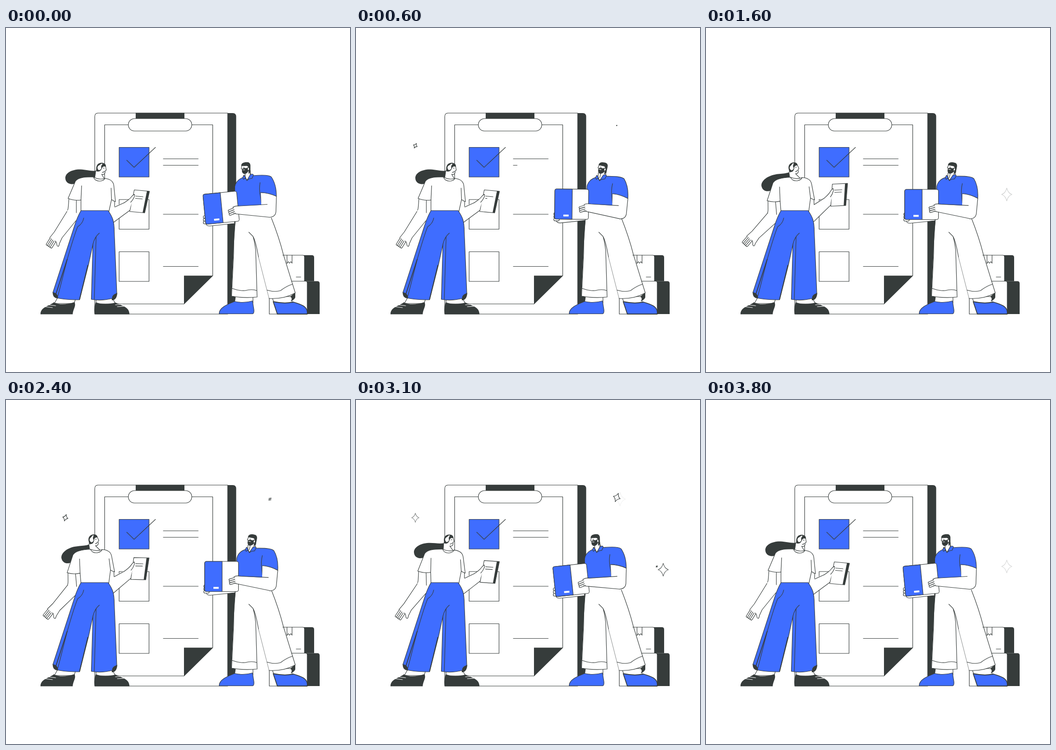
An HTML page for the animation above (3.9 s loop, 748 px wide and 748 px high).

```html
<!DOCTYPE html>
<html lang="en">
<head>
<meta charset="utf-8">
<title>Checklist</title>
<style>
  html, body { margin: 0; width: 100%; height: 100%; overflow: hidden; background: #fff; }
  svg { display: block; width: 100vw; height: 100vh; }
  .art { fill: #fff; stroke: #363c3b; stroke-width: 1.15; stroke-linejoin: round; stroke-linecap: round; }
  .b { fill: #3f6dff; }
  .d { fill: #363c3b; stroke: none; }
  .n { fill: none; }
  .s { stroke: none; }
  .w { stroke: #fff; fill: none; }
  .thin { fill: none; stroke-width: .6; }
  .thick { stroke-width: 1.8; }
  .star { fill: none; vector-effect: non-scaling-stroke; }
</style>
</head>
<body>
<svg viewBox="0 0 748 748">
<g class="art">
  <!-- clipboard -->
  <path d="M482 185H493Q500.500 185 500.500 193V622H482Z" class="d"/>
  <path d="M193 622V193Q193 185 200 185H482V622Z"/>
  <path d="M214.500 600V210.500H449.500V538.500L387 600Z"/>
  <path d="M387 538.500H449.500L387 600.500Z" class="d"/>
  <path d="M282 184.500H388V198H282Z" class="d"/>
  <rect x="266" y="197" width="138" height="27" rx="13.500"/>
  <g id="rows"></g>
  <path d="M262.500 287.500L278.500 303L325 259.500" class="n"/>
  <path id="line" class="n"/>

  <g id="parcels"></g>
  <path d="M611 494V512L614 508L616.500 511.500L619.500 508L622 511.500V494M631 541.500H641" class="n"/>
  <g id="stars"></g>

  <!-- woman, upper body -->
  <g id="wTorso">
    <path id="tail" class="d" d="M205 308C190 314 178 308 162 307.500C144 307 129 315 129 326C129 336 138 341 148 339C162 335 164 323 201 324Z"/>
    <path class="s" d="M137 369L133 404L150 422L160 400L155 370Z"/>
    <path class="n" d="M137 369L135.500 388Q135 396 132 400M153 374V402"/>
    <g id="foreArm">
      <g id="wHand"></g>
      <path class="s" d="M134 396L104 444L96 456L107 465L122 456L152 420L153 402Z"/>
      <path d="M107 463Q110 465 111 473Q115 478 116 469L122 456L152 419" class="n"/>
      <path d="M132.500 399L105 443.500L95 456" class="n"/>
    </g>
    <g id="wHead">
      <path d="M195 312L192.500 330H215L208 318Q214 320 215.500 314V311L218 309L216.500 300L203 295Z"/>
      <path class="d" d="M197 312C194 299 200 293 208 293C215 293.500 218 297 217 302Q211 299 208 306Q206 311 202 312Z"/>
      <path d="M201 309.500Q196 304 200 299.500Q204 297 208 294L211 295.500Q206 300 208 305Q206 310 201 309.500Z"/>
      <path class="n" d="M211.500 305L213.500 304.500M209 314Q212 314 214 312"/>
    </g>
  </g>
  <g id="wArm">
    <path class="s" d="M222 394L263 376L280 362L276 376L268 398L228 426Z"/>
    <path class="n" d="M224 395L258 379.500M228 427L270 396"/>
    <path d="M279 352L312 355L301.500 402L269 399Z"/>
    <path d="M306.500 354.500L312 355L301.500 402L297 401.500Z" class="d"/>
    <path class="n" d="M282 365.500L298 367"/>
    <path id="note" class="n"/>
    <path class="s" d="M257 380L265 374.500L279 361.500L278 369L268 396Z"/>
    <path class="n" d="M257 380L265 374.500Q271 370 274 365.500L279 361.500Q281 363 278 369Q276 374 271 379"/>
  </g>
  <g id="wShirt">
    <path class="s" d="M228 372L237 377L236 392L222 400Z"/>
    <path class="n" d="M236.500 377L236 388"/>
    <path d="M190 324C170 323.500 157 325 151 333L135 370.500Q148 376 163 374V402H223L229.500 373Q235 377 238 377.500L234.500 343Q233 329 215 327Q203 331 190 324Z"/>
    <path class="n" d="M164.500 343L163 374M228.500 348L229.500 373M190 324Q193 333 204 333Q213 332 215 327"/>
  </g>

  <!-- woman, legs -->
  <path d="M112 587L105 599H148L151 590ZM196 588V600H238L232 588Z"/>
  <path class="d" d="M101.500 574Q101 588 114 588V577ZM230 592Q241 592 242 576L230 578Z"/>
  <path class="b" d="M163 397H222C232 411 235.500 420 235.500 444L241 577Q231 580 231 588Q207 594 185.500 590L189 470L180 512L160 591Q128 591 112 587Q113 577 102 575L149 430Q155 411 163 397Z"/>
  <path class="n" d="M169 413Q167 425 156 432Q150 445 134 500L112 586M203 446Q193 454 189 470M196 453L192 590"/>
  <path class="n thick" d="M133 503L108 580M178 516L160 590"/>
  <path class="d" d="M75 622.500C75 607 91 606 104 596.500C117 603 133 601 149 596C153 605 146 610 145 622.500ZM193 622.500Q190 610 195 596.500C210 602 227 600 238 597C255 605 268 607 268.500 622.500Z"/>
  <path class="w" d="M92 602L108 604M85 606L101 608M238 602L253 601M242 606L258 605"/>

  <!-- man, legs -->
  <path d="M499 584L497 598H537V584ZM578 584L583 598H622V584Z"/>
  <path class="d" d="M618 584L629 575V586Q626 592 619 594Q624 588 618 584Z"/>
  <path class="s" d="M500 398H574L578 414C589 446 596 475 603 500L629 576Q604 590 572 588L538 456L546 585Q517 588 490 583L495 480Q497 445 499 420Z"/>
  <path class="n" d="M498.500 419Q495 450 495 490L490.500 583Q517 588 546 585L543 485Q541 465 537 453L528 444M537 453Q543 463 549 498M572 588Q604 590 629 576L603 492Q594 456 577 413M491 566Q507 572 520 571Q535 567 545.500 571M567.500 570Q585 575 597 571Q610 561 623 557"/>
  <path class="thin" d="M549 498L572 588"/>
  <path class="b" d="M463.500 621.500C463 608 481 601 497 594.500Q517 599 536 593.500L539 612Q540 621 536 621.500Z"/>
  <path class="b thick" d="M581 595Q605 600 625 596C646 602 657 607 655 622H590Z"/>

  <!-- man, upper body -->
  <g id="mTorso">
    <path class="b" d="M515 325Q500 331 497.500 345V360L503 388H556L554 358Q570 358 588 366Q588 340 577 324Q571 318 537 321Z"/>
    <path class="n" d="M552.500 336Q550 350 553 365L556 384"/>
    <path class="s" d="M554 358Q570 358 588 366L587 402Q584 411 573 411L556 405Z"/>
    <path class="n" d="M554 358Q570 358 588 366L587 399Q586 411 573 411.500"/>
    <path d="M520 315V326L524 331L533 321L530 308Z"/>
    <g id="mHead">
      <path class="s" d="M513 297L512 308L520 319V324L531 321V300Z"/>
      <path class="n" d="M513 298L511.500 306L514 307M520 316V326M531 310V321M516 303H518"/>
      <path class="d" d="M511.500 300C511 292 521 291 527 292Q532 294 531.500 301V311Q530 316 527.500 317L527 303Q525 299 521 300Z"/>
      <path class="d" d="M513 307Q517 303 522 305L526 303L527 311Q524 317 518 317.500Q512 316 513 307Z"/>
      <path class="w" d="M515 308.500H519"/>
      <path d="M525 304Q529 302 529 307Q528 311 525.500 309Z"/>
    </g>
    <path class="b" d="M517 320Q513 327 517 329L521 325L524 332L520 323ZM524 331L531 319Q538 316 538 320L535 327L529 328Z"/>
  </g>
  <g id="backArm">
    <path d="M434 422Q434 431 443 430.500L497 425V405H440Z"/>
    <g id="backHand"></g>
  </g>
  <g id="box">
    <rect x="432" y="351" width="73.500" height="65.500" rx="4"/>
    <path class="b" d="M470 351H436Q432 351 432 355V412Q432 416.500 436 416.500H470Z"/>
    <rect x="451" y="406.500" width="11.500" height="4" class="s"/>
  </g>
  <g id="mArm">
    <g id="mHand"></g>
    <path class="s" d="M575 384L508 387L495 389L498 402L508 405L573 411Z"/>
    <path class="n" d="M568 383.500L508 387Q499 386 493 390M573 411.500L508 405Q502 405 495 403"/>
  </g>
</g>
</svg>
<script>
const LOOP = 3900, STEP = 100;
const el = id => document.getElementById(id);
const clamp = u => Math.max(0, Math.min(1, u));

function add(parent, tag, cls, attrs) {
  const node = document.createElementNS("http://www.w3.org/2000/svg", tag);
  node.setAttribute("class", cls);
  for (const name in attrs) node.setAttribute(name, attrs[name]);
  return el(parent).appendChild(node);
}

// Checklist rows
for (let i = 0; i < 3; i++) {
  const y = 259.5 + i * 113.5;
  add("rows", "rect", i ? "" : "b", { x: 246, y, width: 65, height: 64.5 });
  add("rows", "path", "n", { d: `M342 ${y + (i ? 32 : 25)}h76` });
}

function parcel(x, y, edge, right, bottom) {
  add("parcels", "path", "d", { d: `M${edge - 4} ${y}H${right - 5}q5 0 5 5V${bottom}H${edge - 4}Z` });
  add("parcels", "path", "", { d: `M${x} ${y}H${edge - 4}q4 0 4 4V${bottom}H${x}Z` });
}
parcel(590, 494, 649, 670, 550.5);
parcel(572.5, 550.5, 655, 682, 622);

// A row of rounded fingers, each shifted by (dx, dy)
function fingers(parent, n, x, y, dx, dy, length, width, angle) {
  for (let i = 0; i < n; i++) {
    add(parent, "rect", "", {
      y: -width / 2, width: length, height: width, rx: width / 2,
      transform: `translate(${x + i * dx} ${y + i * dy}) rotate(${angle})`
    });
  }
}
fingers("wHand", 4, 98, 457, 3, 2, 18, 4, 122);
fingers("backHand", 3, 441, 411, 0, 6, 12, 6, 180);
fingers("mHand", 3, 501, 391, 1, 4, 19, 4, 158);

// Stars pop up in bursts that travel over three spots
const SPOTS = [[129, 256, 10], [567, 212, 15], [654, 362, 14]];
const stars = [290, 2000, 2470].flatMap((begin, burst) => SPOTS.map(([x, y, r], i) => {
  const drift = burst === 1 ? i * 7 : 0;
  return {
    x: x + drift, y: y + drift / 2, r, born: begin + i * 275,
    node: add("stars", "path", "star", { d: "M0-1Q.2-.2 .8 0Q.2.2 0 1Q-.2.2-.8 0Q-.2-.2 0-1Z" })
  };
}));

function ramp(t, from, to) {
  const u = clamp((t - from) / (to - from));
  return u * u * (3 - 2 * u);
}
const bump = (t, mid, reach) => ramp(t, mid - reach, mid) - ramp(t, mid, mid + reach);

const move = (id, x, y, deg = 0, cx = 0, cy = 0) =>
  el(id).setAttribute("transform", `translate(${x} ${y}) rotate(${deg} ${cx} ${cy})`);

function draw(t) {
  const trim = 1 - .89 * bump(t, 600, 600);
  el("line").setAttribute("d", `M342 298.500h${76 * trim}`);
  el("note").setAttribute("d", `M281.500 370.500l${15 * Math.max(trim, .22)} ${1.3 * trim}`);

  // Woman leans back, with a flick of both arms at the end
  const lean = ramp(t, 800, 1650) - ramp(t, 2400, 3500);
  const flick = bump(t, 1600, 300);
  for (const id of ["wTorso", "wShirt"]) move(id, 0, 0, -5 * lean, 192, 397);
  move("wHead", -5 * lean, 0, -10 * lean, 203, 326);
  move("tail", -6 * lean, 2 * lean, -9 * lean, 200, 315);
  move("foreArm", 0, 0, 12 * lean + 2 * flick, 142, 405);
  move("wArm", 3 * lean + flick, -6 * lean, -4 * (lean + flick), 228, 408);

  // Man straightens up and lifts the box, overshooting both ways
  const up = ramp(t, 0, 500) - ramp(t, 2400, 3000) + .1 * (bump(t, 570, 330) - bump(t, 3040, 260));
  move("mTorso", 0, 0, 3.6 * up, 520, 415);
  move("mHead", 4 * up, 0, 8 * up, 527, 322);
  move("backArm", up, -6 * up);
  move("box", up - 1, 7 * (1 - up), -5.5 * (1 - up), 469, 383.5);
  move("mArm", 0, 0, 6 * up, 546, 409);

  for (const s of stars) {
    const age = t - s.born, grow = clamp(age / 540);
    s.node.setAttribute("transform",
      `translate(${s.x} ${s.y}) rotate(${60 * (1 - grow)}) scale(${s.r * grow})`);
    s.node.style.opacity = age > 0 ? 1 - clamp((age - 480) / 370) : 0;
  }
}

const start = performance.now();
function tick() {
  const t = (performance.now() - start) % LOOP;
  draw(Math.floor(t / STEP) * STEP);
  requestAnimationFrame(tick);
}
tick();
</script>
</body>
</html>
```
